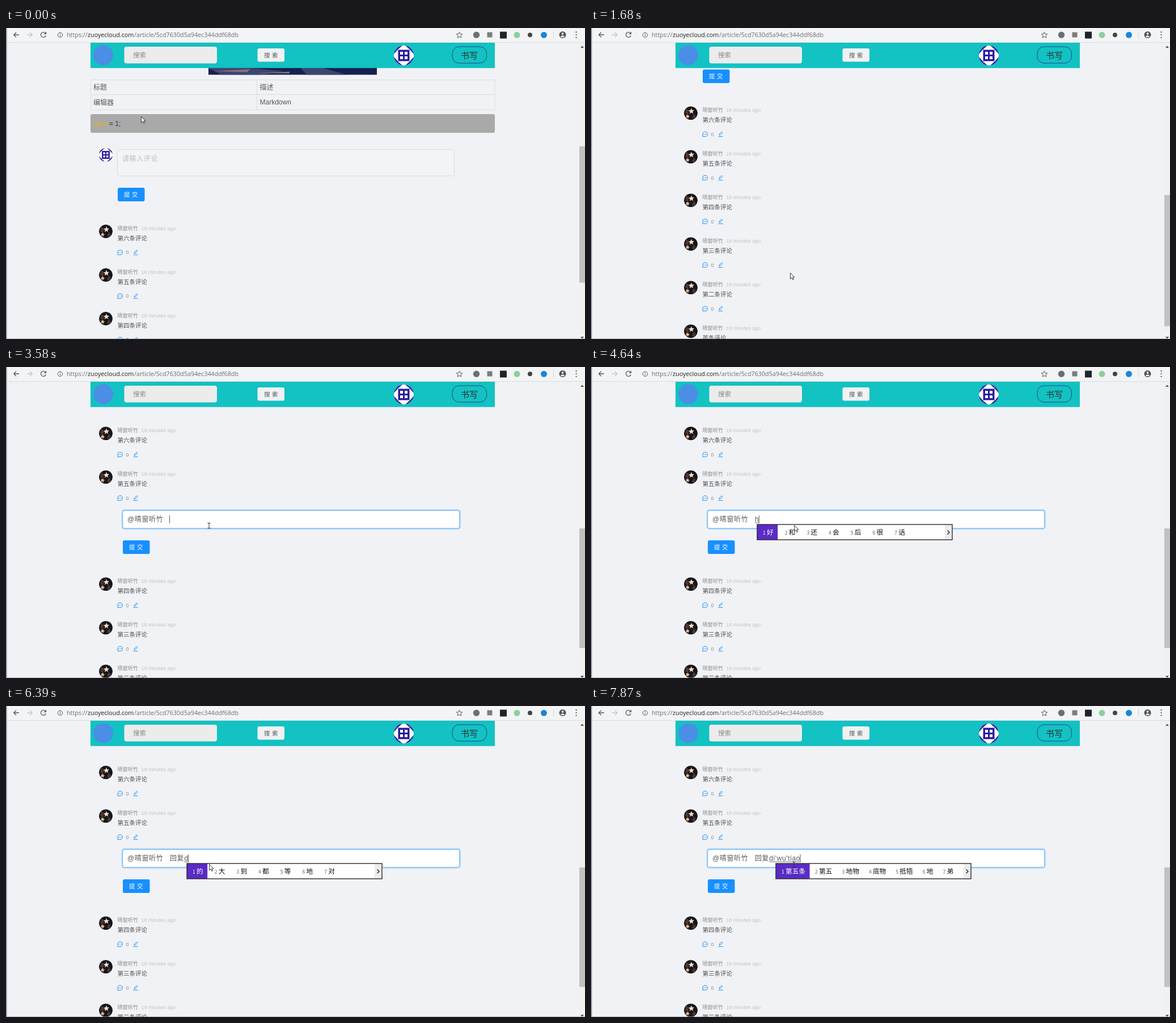
An HTML page for the animation above (7.99 s loop, 1021x549 px).

```html
<!DOCTYPE html>
<html lang="zh">
<head>
<meta charset="utf-8">
<title>Comment reply</title>
<style>
html, body { margin: 0; width: 100%; height: 100%; overflow: hidden; background: #f1f2f5; }
svg { display: block; width: 1021px; height: 549px; }
text { font-family: "Liberation Sans", "Noto Sans CJK SC", "Noto Sans CJK", sans-serif; white-space: pre; }
.url { font: 10.75px "Open Sans", "Noto Sans", sans-serif; fill: #6b6e72; }
.cjk, .ime text { font-family: "Noto Sans CJK SC", "Noto Sans CJK", sans-serif; }
.field { font-size: 12px; letter-spacing: .62px; fill: #595959; }
.cell { font-size: 12px; fill: #595959; }
.btn { font-size: 10.5px; letter-spacing: 3.6px; }
</style>
</head>
<body>
<svg viewBox="0 0 1021 549" xmlns="http://www.w3.org/2000/svg">
  <defs>
    <clipPath id="round"><circle r="17.5"/></clipPath>
    <clipPath id="face"><circle r="12"/></clipPath>
    <clipPath id="list"><rect width="344" height="27"/></clipPath>
    <g id="badge" clip-path="url(#round)">
      <circle r="17.5" fill="#fff"/>
      <g id="corners" fill="#2b1a9b"></g>
      <path d="M-10-10H10V10H-10Z" fill="#2b1a9b"/>
      <path d="M-6.5-6.5h5v5h-5zM1.5-6.5h5v5h-5zM-6.5 1.5h5v5h-5zM1.5 1.5h5v5h-5z" fill="#fff"/>
    </g>
    <g id="photo" clip-path="url(#face)">
      <circle r="12" fill="#15151d"/>
      <path d="M-8-9L-3-4L-5 3L-10 0ZM5 1L9 5L6 11L2 8Z" fill="#4a3534"/>
      <path id="star" d="M1-9L2.2-5.5L6-5L3.2-2.5L4.3 1L1-1L-2 1.2L-1.3-2.4L-4-4.5L-.4-5.3Z" fill="#f6dfbd"/>
      <path d="M-5 2L-4 4.6L-1.6 5.4L-4 7L-4.3 9.5L-6.4 7.6L-9 8L-7.8 5.5L-9 3.3L-6.6 4Z" fill="#e8b87f"/>
    </g>
    <g id="arrow"><path d="M.5.5V11L3 8.7L4.8 12.6L6.5 11.8L4.8 8H8Z" fill="#fff" stroke="#222" stroke-width=".9"/></g>
    <g id="hand"><path d="M-1 0Q.3-1.4 1.4 0V4.5L6.6 5.8Q7.6 6.3 7.3 8L6.3 13H0L-3.8 7.3Q-3.5 5.5-1 7.5Z" fill="#fff" stroke="#222" stroke-width=".9"/></g>
    <g id="beam"><path d="M-2.5-4.5H2.5M0-4.5V4.5M-2.5 4.5H2.5" fill="none" stroke="#333"/></g>
  </defs>

  <rect width="1021" height="549" fill="#f1f2f5"/>
  <g id="page">
    <rect x="357" y="40" width="297" height="42.5" fill="#17204f"/>
    <path d="M357 71H430L490 76L450 82.5H380ZM520 71H560L600 82.5H530Z" fill="#3d4470"/>
    <path d="M366 76L430 73L425 78ZM440 80L500 77V80Z" fill="#8a7079"/>
    <path d="M149.5 91.5H862V144.5H149.5ZM149.5 117.5H862M442.5 91.5V144.5" fill="none" stroke="#dcdde0"/>
    <text class="cell" x="154" y="108.5">标题</text><text class="cell" x="447.5" y="108.5">描述</text>
    <text class="cell" x="154" y="135.5">编辑器</text><text class="cell" x="447.5" y="135">Markdown</text>
    <rect x="149" y="152" width="713" height="33" rx="3" fill="#a9a9a9"/>
    <text x="156" y="172.5" font-size="12" fill="#e8b500">let a <tspan fill="#1f1f3c">= </tspan><tspan fill="#33336a">1;</tspan></text>
    <use href="#badge" transform="translate(176 224) scale(.69)"/>
    <rect x="196.5" y="214.5" width="594" height="46.5" rx="3" fill="#f3f4f6" stroke="#d9dadd"/>
    <text class="field" x="205" y="234.8" style="fill:#bfbfbf">请输入评论</text>
    <g class="submit" transform="translate(197 282)"></g>
    <g id="upper"></g>
    <g id="lower"></g>
    <g id="more">
      <path d="M164 712.5H848" stroke="#e6e7ea"/>
      <rect x="473.5" y="721.5" width="64.5" height="24" rx="3" fill="#f3f4f6" stroke="#d9dadd"/>
      <text x="485" y="737.3" font-size="10.5" fill="#595959">加载更多</text>
    </g>
    <g id="reply">
      <rect id="glow" x="204.7" y="494" width="596" height="33.5" rx="4" fill="none" stroke="#1890ff" stroke-width="2"/>
      <rect id="input" x="205.7" y="495" width="594" height="31.5" rx="3" fill="#fff"/>
      <text class="field" x="214" y="515">@晴窗听竹</text>
      <text class="field" id="done" x="289" y="515"></text>
      <text class="field" id="comp" y="514.7"></text>
      <path id="under" stroke="#555" stroke-width=".9"/>
      <path id="caret" stroke="#444" stroke-width=".9"/>
      <g class="submit" transform="translate(206 547.7)"></g>
    </g>
  </g>

  <g id="tip">
    <path d="M215 194H242Q245 194 245 197V215Q245 218 242 218H232.5L228.5 222L224.5 218H215Q212 218 212 215V197Q212 194 215 194Z" fill="#404142"/>
    <text x="218" y="209.8" font-size="10.5" fill="#fff">回复</text>
  </g>

  <rect x="149" y="26" width="713" height="44.7" fill="#13c2c2"/>
  <circle cx="171.5" cy="48" r="17.5" fill="#4a8ee6"/>
  <rect x="208.5" y="33" width="163.5" height="29.5" rx="4" fill="#ececec"/>
  <text x="224" y="51.8" font-size="11.5" fill="#8a8a8a">搜索</text>
  <rect x="443.5" y="36" width="47.5" height="23.5" rx="3" fill="#f0f2f4"/>
  <text class="btn" x="455" y="51.6" fill="#555">搜索</text>
  <use href="#badge" transform="translate(701.5 48.5)"/>
  <rect x="787" y="33" width="60.5" height="29" rx="12" fill="none" stroke="#24478c"/>
  <text x="802" y="53.8" font-size="15" fill="#263238">书写</text>

  <rect width="1021" height="25.5" fill="#f3f4f5"/>
  <path d="M0 25.5H1021" stroke="#dcdddf"/>
  <g fill="none" stroke="#55585c" stroke-width="1.3">
    <path d="M23 12H14M18 7.7L13.7 12L18 16.3"/>
    <path d="M37 12H46M42 7.7L46.3 12L42 16.3" stroke="#c4c6c8"/>
    <path d="M69.8 9.5A4.5 4.5 0 1 0 70.3 13.2M70.5 7V10.3H67.2"/>
    <circle cx="95.5" cy="12.3" r="4.2" stroke-width="1"/><path d="M95.5 11.5V14.8M95.5 9.4V10.5" stroke-width="1"/>
    <path d="M799.5 7L801 10.6L804.8 10.9L801.9 13.4L802.8 17.2L799.5 15.1L796.2 17.2L797.1 13.4L794.2 10.9L798 10.6Z" stroke-width="1"/>
  </g>
  <text class="url" y="16"><tspan x="107">https://</tspan><tspan x="144" fill="#222">zuoyecloud.com</tspan><tspan x="226">/article/5cd7630d5a94ec344ddf68db</tspan></text>
  <circle cx="829.5" cy="12.3" r="5.7" fill="#6c6f73"/>
  <rect x="848.5" y="7.5" width="9" height="9" fill="#7d7d7d"/>
  <rect x="871" y="6.5" width="12" height="12" fill="#20232a"/>
  <circle cx="901" cy="12.3" r="5.5" fill="#8ccf9c"/>
  <circle cx="924" cy="12.3" r="4" fill="#444"/>
  <circle cx="948.5" cy="12.3" r="5.5" fill="#1b86d6"/>
  <path d="M965.5 5V19" stroke="#d5d6d8"/>
  <circle cx="981.5" cy="12" r="6" fill="#4f5257"/>
  <circle cx="981.5" cy="10" r="1.9" fill="#f3f4f5"/><path d="M977.7 15Q981.5 11.3 985.3 15Q981.5 18 977.7 15Z" fill="#f3f4f5"/>
  <path d="M1005.5 7.2h.1M1005.5 12h.1M1005.5 16.8h.1" stroke="#4f5257" stroke-width="2.2" stroke-linecap="round"/>

  <rect x="1010.5" y="26" width="10.5" height="523" fill="#f1f1f2"/>
  <path d="M1013 35L1016 31.5L1019 35ZM1013 545L1016 548.5L1019 545Z" fill="#505050"/>
  <rect id="thumb" x="1011" width="10" fill="#c1c1c1"/>
  <rect width="1.6" height="549" fill="#8590a2"/>
  <path d="M0 548.6H1021" stroke="#9a9da3" stroke-width=".8"/>

  <g id="ime" class="ime">
    <g clip-path="url(#list)"><rect width="344" height="27" fill="#fff"/><g id="cands"></g>
      <rect x="331" width="13" height="27" fill="#e9e9e9" opacity=".85"/></g>
    <path d="M335.5 10.5L339 14L335.5 17.5" fill="none" stroke="#333" stroke-width="1.5"/>
    <rect width="344" height="27" fill="none" stroke="#2a2a2e" stroke-width="1.4"/>
  </g>
  <use id="cursor"/>
</svg>
<script>
const $ = id => document.getElementById(id);
const LOOP = 7990, PITCH = 77, REPLY_HEIGHT = 112;

// Each track is a list of [start time, ...values]; the last started one holds.
const scrollTrack = [[0, 0], [120, 100], [280, 198.5], [1680, 208.7], [1830, 226], [1950, 241.7]];
const cursorTrack = [
  [0, 'arrow', 238, 156], [120, 'arrow', 238, 161], [280, 'arrow', 237, 166],
  [405, 'arrow', 270, 232], [530, 'arrow', 370, 370], [655, 'arrow', 460, 484], [780, 'hand', 506, 532],
  [1290, 'arrow', 470, 505], [1410, 'arrow', 400, 460], [1530, 'arrow', 351, 432],
  [1950, 'arrow', 285, 272], [2120, 'arrow', 242, 234], [2260, 'arrow', 240, 231],
  [2410, 'hand', 229, 230], [3040, 'arrow', 262, 262], [3190, 'beam', 325, 286],
  [3310, 'beam', 352, 284], [3460, 'beam', 358, 280]
];
const tipTrack = [[0, 0], [2410, .3], [2530, .7], [2650, 1], [2920, .4], [3040, 0]];
const glowTrack = [[0, 0], [3460, .12], [3580, .3]];
// time, committed, composing, popup left (0 = hidden), candidates, gap
const typingTrack = [
  [0, '', '', 0, '', 0],
  [4640, '', 'h', 293, '好 和 还 会 后 很 话', 20],
  [4760, '', 'hu', 299, '胡 湖 户 护 互 呼 虎', 20],
  [4880, '', 'hui', 302.5, '会 回 灰 汇 惠 挥 辉', 20],
  [5460, '', "hui'f", 312.5, '回复 会否 恢复 回访 回放 灰粉 会飞', 18.7],
  [5710, '', "hui'fu", 320, '回复 恢复 会否 回府 回 会 灰', 20],
  [5830, '回复', '', 0, '', 0],
  [6390, '回复', 'd', 319, '的 大 到 都 等 地 对', 20],
  [6510, '回复', 'di', 322.5, '第 地 低 底 弟 敌 滴', 20],
  [6760, '回复', "di'w", 335, '第五 低温 地位 敌我 地 弟 低', 20],
  [6910, '回复', "di'w", 335, '第五 地位 低温 敌我 地 弟 低', 20],
  [7060, '回复', "di'wu", 342.5, '第五 地物 底物 抵牾 地 弟 低', 20],
  [7180, '回复', "di'wu't", 350, '第五天 第五 地物 底物 抵牾 地 弟', 17],
  [7330, '回复', "di'wu'ti", 353, '第五题 第五 地物 底物 抵牾 地 弟', 17],
  [7450, '回复', "di'wu'tia", 353, '第五题 第五 地物 底物 抵牾 地 弟', 17],
  [7600, '回复', "di'wu'tia", 361.5, '第五天 第五 地物 底物 抵牾 地 弟', 17],
  [7750, '回复', "di'wu'tiao", 368, '第五条 第五 地物 底物 抵牾 地 弟', 17],
  [7870, '回复', "di'wu'tiao", 326, '第五条 第五 地物 底物 抵牾 地 弟', 17]
];

const at = (track, t) => track.filter(key => key[0] <= t).pop().slice(1);
const show = (id, on) => $(id).setAttribute('visibility', on ? 'visible' : 'hidden');
const set = (id, attrs) => Object.entries(attrs).forEach(([k, v]) => $(id).setAttribute(k, v));

function comment(i) {
  const word = ['第六条', '第五条', '第四条', '第三条', '第二条', '首条'][i];
  return `<g ${i === 5 ? 'id="extra"' : ''} transform="translate(0 ${353.5 + PITCH * i})">
    <use href="#photo" x="176" y="5.5"/>
    <text class="cjk" x="196.5" y="3.4" font-size="9.1" fill="#8c8d90">晴窗听竹</text>
    <text x="238.5" y="3.2" font-size="8.9" fill="#c3c4c7">${i > 3 ? 19 : 18} minutes ago</text>
    <text x="196.5" y="21.4" font-size="10.5" fill="#4f5053">${word}评论</text>
    <g fill="none" stroke="#1890ff">
      <path d="M197 46.8V42.5A4.2 4.2 0 1 1 201.2 46.8Z"/>
      <path d="M199 42.6h.1M201.2 42.6h.1M203.4 42.6h.1" stroke-linecap="round" stroke-width="1.2"/>
      <path d="M224.5 46.8H232.5M226 44.5L226.6 42.2L230.4 38.4L232 40L228.2 43.8Z"/>
    </g>
    <text x="211.5" y="45.8" font-size="9" fill="#8c8d90">0</text>
  </g>`;
}

function candidateList(words, gap) {
  let x = 10;
  return words.split(' ').map((word, i) => {
    const width = 7 + 11.7 * word.length, first = i === 0;
    const item = (first ? `<rect width="${width + 17.5}" height="27" fill="#5a2bc5"/>` : '') +
      `<text x="${x}" y="17.6" font-size="8.5" fill="${first ? '#fff' : '#666'}">${i + 1}</text>` +
      `<text x="${x + 7}" y="18.2" font-size="11.7" fill="${first ? '#fff' : '#111'}">${word}</text>`;
    x += width + gap;
    return item;
  }).join('');
}

$('corners').innerHTML = [0, 90, 180, 270].map(a =>
  `<path transform="rotate(${a})" d="M-10-18H-2L-10-11ZM10-18H2L10-11ZM-18-18H-10V-10H-18Z"/>`).join('');
document.querySelectorAll('.submit').forEach(g => g.innerHTML =
  '<rect width="47.5" height="24" rx="3" fill="#1890ff"/><text class="btn" x="11" y="15.8" fill="#fff">提交</text>');
$('upper').innerHTML = [0, 1].map(comment).join('');
$('lower').innerHTML = [2, 3, 4, 5].map(comment).join('');

let shownList = '';

function draw(t) {
  const [scroll] = at(scrollTrack, t);
  const loaded = t >= 1050, open = t >= 2920, focused = t >= 3460;
  set('page', { transform: `translate(0 ${-scroll})` });
  set('lower', { transform: `translate(0 ${open ? REPLY_HEIGHT : 0})` });
  show('extra', loaded);
  show('more', !loaded);
  $('reply').style.display = open ? '' : 'none';
  set('tip', { opacity: at(tipTrack, t)[0] });

  const height = 1092.5 + (loaded ? 43 : 0) + (open ? REPLY_HEIGHT : 0);
  set('thumb', { y: 38 + 503 * (371 + scroll) / height, height: 503 * 523 / height });

  const [done, comp, left, words, gap] = at(typingTrack, t);
  set('glow', { opacity: at(glowTrack, t)[0] });
  set('input', { stroke: t >= 3190 ? '#5eb2f8' : '#d9dadd' });
  const start = 289 + done.length * 12.62;
  $('done').textContent = done;
  $('comp').textContent = comp;
  set('comp', { x: start });
  const end = comp ? start + $('comp').getComputedTextLength() : done ? start : 288.5;
  set('under', { d: comp ? `M${start} 516.7H${end}` : '' });
  set('caret', { d: `M${end} 503.7V517.5` });
  $('caret').style.display = focused && !(t >= 4060 && t < 4490) ? '' : 'none';

  show('ime', left > 0);
  set('ime', { transform: `translate(${left} 278)` });
  if (words + gap !== shownList) {
    shownList = words + gap;
    $('cands').innerHTML = words ? candidateList(words, gap) : '';
  }

  const [shape, x, y] = at(cursorTrack, t);
  const overList = left > 0 && left < 358 && t < 7600;
  set('cursor', { href: '#' + (overList ? 'arrow' : shape), transform: `translate(${x} ${y - (overList ? 1 : 0)})` });
}

function frame() {
  draw(performance.now() % LOOP);
  requestAnimationFrame(frame);
}
frame();
</script>
</body>
</html>
```
